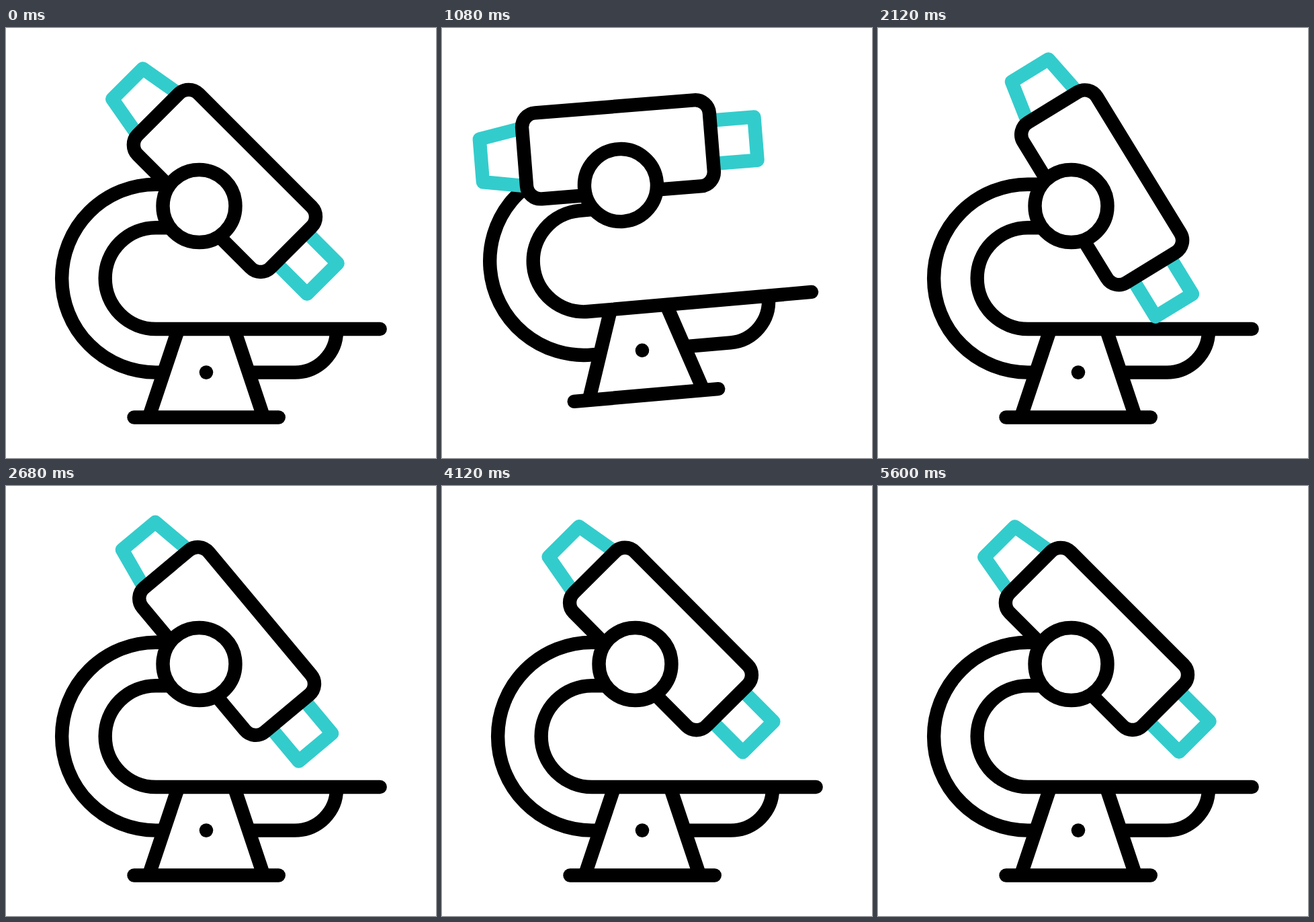
An HTML page that plays this animation: 640x640 px, repeating every 6680 ms.

```html
<!DOCTYPE html>
<html lang="en">
<head>
<meta charset="utf-8">
<title>Microscope</title>
<style>
  html, body { margin: 0; width: 100%; height: 100%; overflow: hidden; background: #fff; }
  svg { display: block; width: 100vw; height: 100vh; }
</style>
</head>
<body>
<svg viewBox="0 0 640 640" fill="none" stroke="#000" stroke-width="20.4" stroke-linecap="round" stroke-linejoin="round">
  <g id="scope">
    <g stroke-linecap="butt">
      <path d="M238 232.7H223a139.95 139.95 0 0 0 0 279.9H235"/>
      <path d="M366 512.6H430a62 62 0 0 0 62 -62"/>
      <path d="M256.5 448L212.5 579.5M339.5 448L383.5 579.5"/>
    </g>
    <path d="M242 297.2H223a75.4 75.4 0 0 0 0 150.8H556.7"/>
    <path d="M190.5 579.5H405.8"/>
    <circle cx="298" cy="512.6" r="10.3" fill="#000" stroke="none"/>
    <g id="tube">
      <g stroke="#3cc">
        <path d="M-139 -96.7L-204 -85.3V-21.2L-139 -9.8"/>
        <path d="M140 -85.5H206V-21H140"/>
      </g>
      <rect x="-139.6" y="-117.6" width="279.7" height="128.4" rx="21" fill="#fff"/>
    </g>
    <circle cx="287.5" cy="265" r="54" fill="#fff"/>
  </g>
</svg>
<script>
  const LOOP = 6680, TICK = 40, STEP = 400 / 3, LAST_STEP = 42;
  const scope = document.getElementById('scope');
  const tube = document.getElementById('tube');

  // Keys: [time in ms, angle in degrees, optional time warp towards this key]
  const tiltKeys = [[100, 0], [750, -5], [1100, -5], [1950, 0]];
  const tubeKeys = [[100, 0], [1010, -45], [2140, 13.5], [3340, -7], [4670, 4.1], [5600, 0, 0.75]];

  function valueAt(keys, t) {
    const i = keys.findIndex(key => t < key[0]);
    if (i === 0) return keys[0][1];
    if (i < 0) return keys[keys.length - 1][1];
    const [t0, v0] = keys[i - 1];
    const [t1, v1, warp = 1] = keys[i];
    const x = ((t - t0) / (t1 - t0)) ** warp;
    return v0 + (v1 - v0) * x * x * (3 - 2 * x);
  }

  function draw(now) {
    // Poses advance at 7.5 per second, shown on a 40 ms grid.
    const tick = Math.floor((now % LOOP) / TICK);
    const t = Math.min(LAST_STEP, Math.floor((3 * tick + 1) / 10)) * STEP;
    const tilt = valueAt(tiltKeys, t);
    scope.setAttribute('transform', `translate(0 ${tilt * 6.55}) rotate(${tilt} 298 512.6)`);
    tube.setAttribute('transform', `translate(287.5 265) rotate(${45 + valueAt(tubeKeys, t)})`);
    requestAnimationFrame(() => draw(performance.now()));
  }

  draw(performance.now());
</script>
</body>
</html>
```
